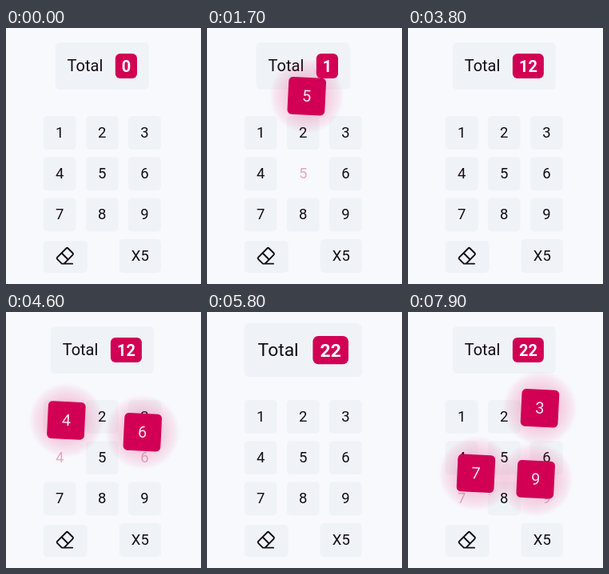
These frames come from a looping animation (244x320 px, 8000 ms). An HTML page:

```html
<!DOCTYPE html>
<html lang="en">
<head>
<meta charset="utf-8">
<title>Keypad total</title>
<style>
  html, body { margin: 0; width: 100%; height: 100%; overflow: hidden; background: #f7f9fd; }
  svg { display: block; width: 244px; height: 320px; font-family: Roboto, sans-serif; }
</style>
</head>
<body>
<svg id="stage" viewBox="0 0 244 320">
  <defs>
    <radialGradient id="glow">
      <stop offset="0.5" stop-color="#e8005c" stop-opacity="0.19"/>
      <stop offset="0.68" stop-color="#e8005c" stop-opacity="0.13"/>
      <stop offset="0.86" stop-color="#e8005c" stop-opacity="0.07"/>
      <stop offset="1" stop-color="#e8005c" stop-opacity="0"/>
    </radialGradient>
  </defs>
</svg>
<script>
const LOOP = 8000, PICK = 260;
const INK = [20, 12, 22], FADED = [224, 172, 194], WHITE = [255, 228, 240];
const KEY = '#eff3f7', RED = '#d10055';
const stage = document.getElementById('stage');

// Each drag: digit, pick-up time, drop time and [time, x, y] stops.
const drags = [
  { n: 1, from: 50, drop: 580, stops: [[120, 67, 131], [350, 104, 88], [580, 148, 54]] },
  { n: 5, from: 1440, drop: 1900, stops: [[1490, 120, 182], [1700, 124.7, 85.5], [1900, 148, 54]] },
  { n: 6, from: 2520, drop: 3060, stops: [[2620, 173.5, 182], [2860, 166, 100], [3060, 152, 54]] },
  { n: 4, from: 4150, drop: 5520, stops: [[4250, 67, 182], [4700, 78, 122], [5100, 84.4, 97.3], [5520, 146, 54]] },
  { n: 6, from: 4300, drop: 5380, stops: [[4400, 173.5, 182], [4800, 167, 104], [5100, 165.5, 76.3], [5380, 152, 54]] },
  { n: 7, from: 6330, drop: 1e5, stops: [[6420, 67, 233], [6700, 68, 202], [7200, 84, 201], [7900, 85, 201.8]] },
  { n: 9, from: 6330, drop: 1e5, stops: [[6420, 173.5, 233], [6700, 177, 175], [7250, 164, 201], [7900, 159.7, 209.2]] },
  { n: 3, from: 7350, drop: 1e5, stops: [[7450, 173.5, 131], [7900, 165, 120.3]] }
];

const clamp = v => Math.max(0, Math.min(1, v));
const ease = v => { const p = clamp(v); return p * p * (3 - 2 * p); };
const mix = (a, b, p) => a + (b - a) * p;
const blend = (a, b, p) => `rgb(${a.map((v, i) => Math.round(mix(v, b[i], p)))})`;

function set(el, attrs) {
  for (const k in attrs) el.setAttribute(k, attrs[k]);
  return el;
}
function add(parent, tag, attrs, text) {
  const el = set(document.createElementNS('http://www.w3.org/2000/svg', tag), attrs);
  if (text !== undefined) el.textContent = text;
  return parent.appendChild(el);
}
function label(parent, x, y, text, size, more) {
  return add(parent, 'text', { x, y, 'font-size': size, 'text-anchor': 'middle', fill: blend(INK, INK, 0), ...more }, text);
}
function box(parent, x, y, width, height, fill, rx = 5) {
  return add(parent, 'rect', { x, y, width, height, rx, fill });
}

// Smooth curve through timed stops, at rest at both ends.
function place(stops, t) {
  const last = stops.length - 1;
  if (t <= stops[0][0]) return stops[0].slice(1);
  if (t >= stops[last][0]) return stops[last].slice(1);
  let i = 0;
  while (t > stops[i + 1][0]) i++;
  const a = stops[i], b = stops[i + 1], d = b[0] - a[0], p = (t - a[0]) / d;
  const slope = (j, k) => j === 0 || j === last ? 0
    : (stops[j + 1][k] - stops[j - 1][k]) / (stops[j + 1][0] - stops[j - 1][0]);
  return [1, 2].map(k => mix(a[k], b[k], ease(p))
    + d * (slope(i, k) * p * (1 - p) ** 2 - slope(i + 1, k) * p * p * (1 - p)));
}

// Total panel
const panel = add(stage, 'g', {});
const panelBox = box(panel, 0, -29.5, 0, 59, KEY, 6);
const title = label(panel, 0, 6.8, 'Total', 20, { 'text-anchor': 'start' });
const badge = box(panel, 0, -15.5, 0, 31, RED, 6);
const sum = label(panel, 0, 7, '0', 20, { fill: '#fff', 'font-weight': 700 });

// Keys
const keys = [];
for (let n = 1; n <= 9; n++) {
  const x = 67.2 + (n - 1) % 3 * 53.1, y = 131 + Math.floor((n - 1) / 3) * 51.2;
  keys[n] = {
    face: box(stage, x - 20.5, y - 21, 41, 42, KEY),
    text: label(stage, x, y + 6, n, 18.5)
  };
}
box(stage, 46.7, 266, 55, 40, KEY);
box(stage, 141.7, 264, 52.3, 42, KEY);
label(stage, 167.8, 291, 'X5', 18.5);
add(stage, 'path', {
  transform: 'translate(73.8 285) scale(0.106)',
  d: 'M88 91H-37L-91 37q-11-11 0-22L14-90q11-11 22 0L91-35q11 11 0 22L-11 91M-40-35L37 42',
  fill: 'none', stroke: '#140c16', 'stroke-width': 18, 'stroke-linecap': 'round', 'stroke-linejoin': 'round'
});

// Dragged tiles
for (const d of drags) {
  d.g = add(stage, 'g', {});
  d.glow = add(d.g, 'circle', { r: 47, fill: 'url(#glow)' });
  d.face = box(d.g, -23.4, -23.4, 46.8, 46.8, RED, 5.5);
  d.text = label(d.g, 0, 6.5, d.n, 20);
}

function drawTotal(t) {
  let total = 0, pulse = 0, wide = 0;
  for (const d of drags) {
    if (t < d.drop) continue;
    const before = total;
    total += d.n;
    if (before < 10 && total >= 10) wide = ease((t - d.drop) / 220);
    pulse += 0.1 * Math.sin(Math.PI * Math.sqrt(clamp((t - d.drop) / 640)));
  }
  const w = mix(117.4, 129.2, wide), bw = mix(27.2, 39, wide), right = w / 2 - 15;
  set(panel, { transform: `translate(120.3 47.6) scale(${1 + pulse})` });
  set(panelBox, { x: -w / 2, width: w });
  set(title, { x: 15 - w / 2 });
  set(badge, { x: right - bw, width: bw });
  set(sum, { x: right - bw / 2 });
  sum.textContent = total;
}

function draw(t) {
  drawTotal(t);
  const lifted = Array(10).fill(0);
  for (const d of drags) {
    const on = t > d.from && t < d.drop + 180;
    const g = ease((t - d.from) / PICK), out = ease((t - d.drop) / 180);
    lifted[d.n] = Math.max(lifted[d.n], g * (1 - ease((t - d.drop) / 300)));
    set(d.g, { display: on ? 'inline' : 'none' });
    if (!on) continue;
    const [x, y] = place(d.stops, t), size = mix(0.9, 1, g) * (1 - out * 0.7);
    set(d.g, {
      transform: `translate(${x} ${y}) rotate(${2.8 * g}) scale(${size})`,
      opacity: 1 - out
    });
    set(d.glow, { opacity: clamp(g * 1.6 - 0.6) });
    set(d.face, { 'fill-opacity': g });
    set(d.text, { fill: blend(INK, WHITE, g) });
  }
  for (let n = 1; n <= 9; n++) {
    set(keys[n].face, { opacity: 1 - lifted[n] });
    set(keys[n].text, { fill: blend(INK, FADED, lifted[n]) });
  }
}

const start = performance.now();
function tick() {
  draw((performance.now() - start) % LOOP);
  requestAnimationFrame(tick);
}
tick();
</script>
</body>
</html>
```
